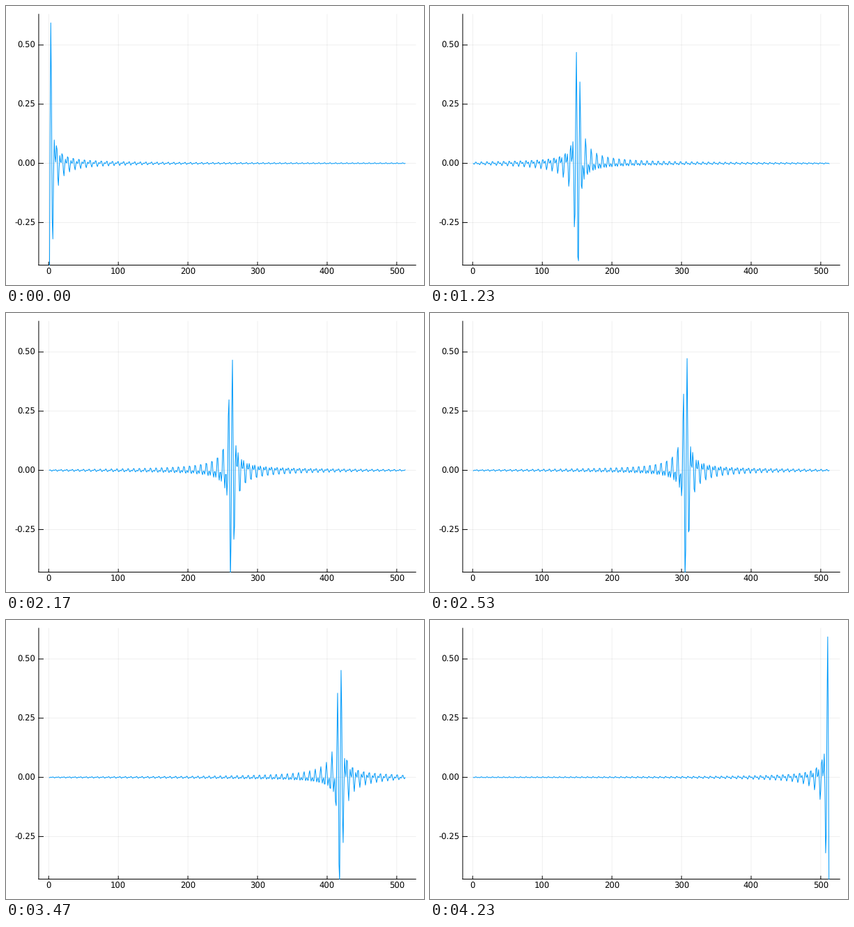
Write a matplotlib script that moves like this. It is 600x400 px and loops after 4.26 s.

```python
import numpy as np
import matplotlib.pyplot as plt
from matplotlib.animation import FuncAnimation
from matplotlib.lines import Line2D

W, H, DPI = 600, 400, 100
PX = 72 / DPI                    # one pixel in points
LOOP, TICK = 4260, 20            # ms
RATE = 0.03                      # wavelets per ms
N, COUNT = 512, 128              # samples, wavelets
LEFT, RIGHT, TOP, BOTTOM = 46.95, 588.2, 11.8, 371.5
XLIM = (1 - 0.03 * (N - 1), N + 0.03 * (N - 1))
YLIM = (-0.43, 0.63)

plt.rcParams["font.family"] = "DejaVu Sans"
plt.rcParams["path.simplify"] = False
plt.rcParams["text.hinting"] = "no_hinting"


def nearest_rotation(m):
    u, _, vt = np.linalg.svd(m)
    return u @ vt


def wavelets(steps=150):
    """Varimax rotation of the second quarter of the cosine basis."""
    idx = np.arange(COUNT)
    pos = np.arange(N) + 0.5
    basis = np.cos(np.pi * np.outer(pos, idx + COUNT) / N) * np.sqrt(2 / N)
    phase = np.pi * np.outer(idx + 0.5, idx + 0.5) / COUNT
    rot = nearest_rotation(np.cos(phase) + np.sin(phase))
    for _ in range(steps):
        rot = nearest_rotation(basis.T @ (basis @ rot) ** 3)
    waves = basis @ rot
    peak = np.abs(waves).argmax(axis=0)
    return waves * np.sign(waves[peak, idx])   # largest entry points up


def px_x(v):
    return LEFT + (v - XLIM[0]) / (XLIM[1] - XLIM[0]) * (RIGHT - LEFT)


def px_y(v):
    return BOTTOM - (v - YLIM[0]) / (YLIM[1] - YLIM[0]) * (BOTTOM - TOP)


def stroke(x0, y0, x1, y1, width=1.0, alpha=1.0):
    """Straight line in pixels, kept off the pixel grid and under the curve."""
    fig.add_artist(Line2D([x0 / W, x1 / W], [1 - y0 / H, 1 - y1 / H],
                          color="black", alpha=alpha, linewidth=width * PX,
                          snap=False, zorder=-1))


def label(x, y, text, ha):
    fig.text(x / W, 1 - y / H, text, ha=ha, va="baseline", fontsize=8.4)


fig = plt.figure(figsize=(W / DPI, H / DPI), dpi=DPI, facecolor="white")
ax = fig.add_axes([LEFT / W, 1 - BOTTOM / H,
                   (RIGHT - LEFT) / W, (BOTTOM - TOP) / H])
ax.set(xlim=XLIM, ylim=YLIM)
ax.axis("off")

for v in range(0, 501, 100):
    x = px_x(v)
    stroke(x, TOP, x, BOTTOM, 0.6, 0.1)
    stroke(x, BOTTOM, x, BOTTOM - 4.3)
    label(x, 385, str(v), "center")
for v in (-0.25, 0, 0.25, 0.5):
    y = px_y(v)
    stroke(LEFT, y, RIGHT, y, 0.6, 0.1)
    stroke(LEFT, y, LEFT + 6.5, y)
    label(42.3, y + 4, f"{v:.2f}", "right")
stroke(LEFT, TOP, LEFT, BOTTOM)
stroke(LEFT, BOTTOM, RIGHT, BOTTOM)

waves = wavelets()
line, = ax.plot(np.arange(1, N + 1), waves[:, 0], color="#009AFA",
                linewidth=PX)


def update(i):
    t = (i + 0.5) * TICK
    line.set_ydata(waves[:, int((t + 5) * RATE)])   # rounded to 10 ms steps
    return line,


anim = FuncAnimation(fig, update, frames=LOOP // TICK, interval=TICK,
                     repeat=True, repeat_delay=0)
plt.show()
```
